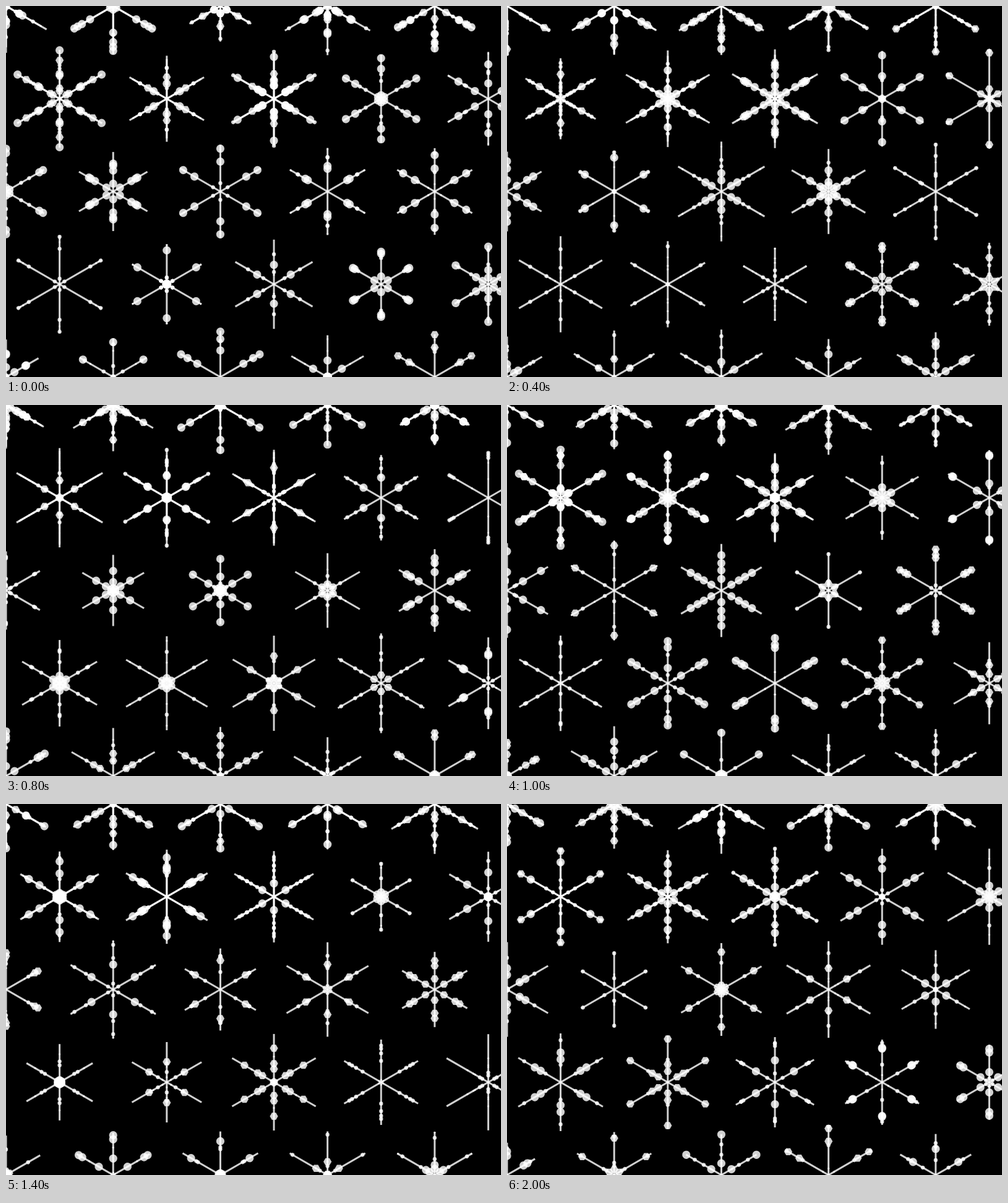
An HTML page with a canvas for the animation above (2200 ms loop, 800 px wide and 600 px high).

```html
<!DOCTYPE html>
<html lang="en">
<head>
<meta charset="utf-8">
<title>Snowflakes</title>
<style>
  html, body { margin: 0; width: 100%; height: 100%; overflow: hidden; background: #000; }
  canvas { display: block; }
</style>
</head>
<body>
<canvas id="stage" width="800" height="600"></canvas>
<script>
const ctx = document.getElementById('stage').getContext('2d');
const STEP = 200, STEPS = 11;
const ROW = 150, HALF = 100 * Math.cos(Math.PI / 6);
const BIG = 6.6, SMALL = 3.2, TINY = 1.6;

// Small seeded generator (mulberry32)
function randomFrom(seed) {
  return () => {
    seed = (seed + 0x6D2B79F5) | 0;
    let t = Math.imul(seed ^ (seed >>> 15), 1 | seed);
    t = (t + Math.imul(t ^ (t >>> 7), 61 | t)) ^ t;
    return ((t ^ (t >>> 14)) >>> 0) / 4294967296;
  };
}

function bead(y, r, sides) {
  ctx.beginPath();
  if (sides) {
    for (let i = 0; i < sides; i++) {
      const a = i * 2 * Math.PI / sides;
      ctx.lineTo(r * Math.cos(a), y + r * Math.sin(a));
    }
    ctx.closePath();
  } else {
    ctx.arc(0, y, r, 0, 2 * Math.PI);
  }
  ctx.fill();
}

function beadSize(u) {
  return u < 0.38 ? BIG : u < 0.8 ? SMALL : TINY;
}

function flake(x, y, random) {
  const length = 50 + 31 * Math.sqrt(random());
  const sides = random() < 0.42 ? 6 : 0;
  const beads = Array.from({ length: 5 }, () => ({
    at: random() * length,
    size: beadSize(random())
  }));
  ctx.save();
  ctx.translate(x, y);
  for (let arm = 0; arm < 6; arm++) {
    ctx.fillRect(-1.5, -length, 3, length);
    for (const { at, size } of beads) bead(-at, size, size === BIG ? sides : 0);
    ctx.rotate(Math.PI / 3);
  }
  ctx.restore();
}

function draw(step) {
  const random = randomFrom(7919 * (step + 1));
  ctx.fillStyle = '#000';
  ctx.fillRect(0, 0, 800, 600);
  ctx.fillStyle = 'rgba(255,255,255,0.82)';
  for (let row = 0; row < 5; row++) {
    for (let col = 0; col < 5; col++) {
      const x = HALF * (2 * col + row % 2), y = ROW * row;
      // The first eight places carry two flakes on top of each other
      const layers = row * 5 + col < 8 ? 2 : 1;
      for (let i = 0; i < layers; i++) flake(x, y, random);
    }
  }
}

const start = performance.now();
let shown = -1;
function tick() {
  const step = Math.floor((performance.now() - start) / STEP) % STEPS;
  if (step !== shown) draw(shown = step);
  requestAnimationFrame(tick);
}
tick();
</script>
</body>
</html>
```
